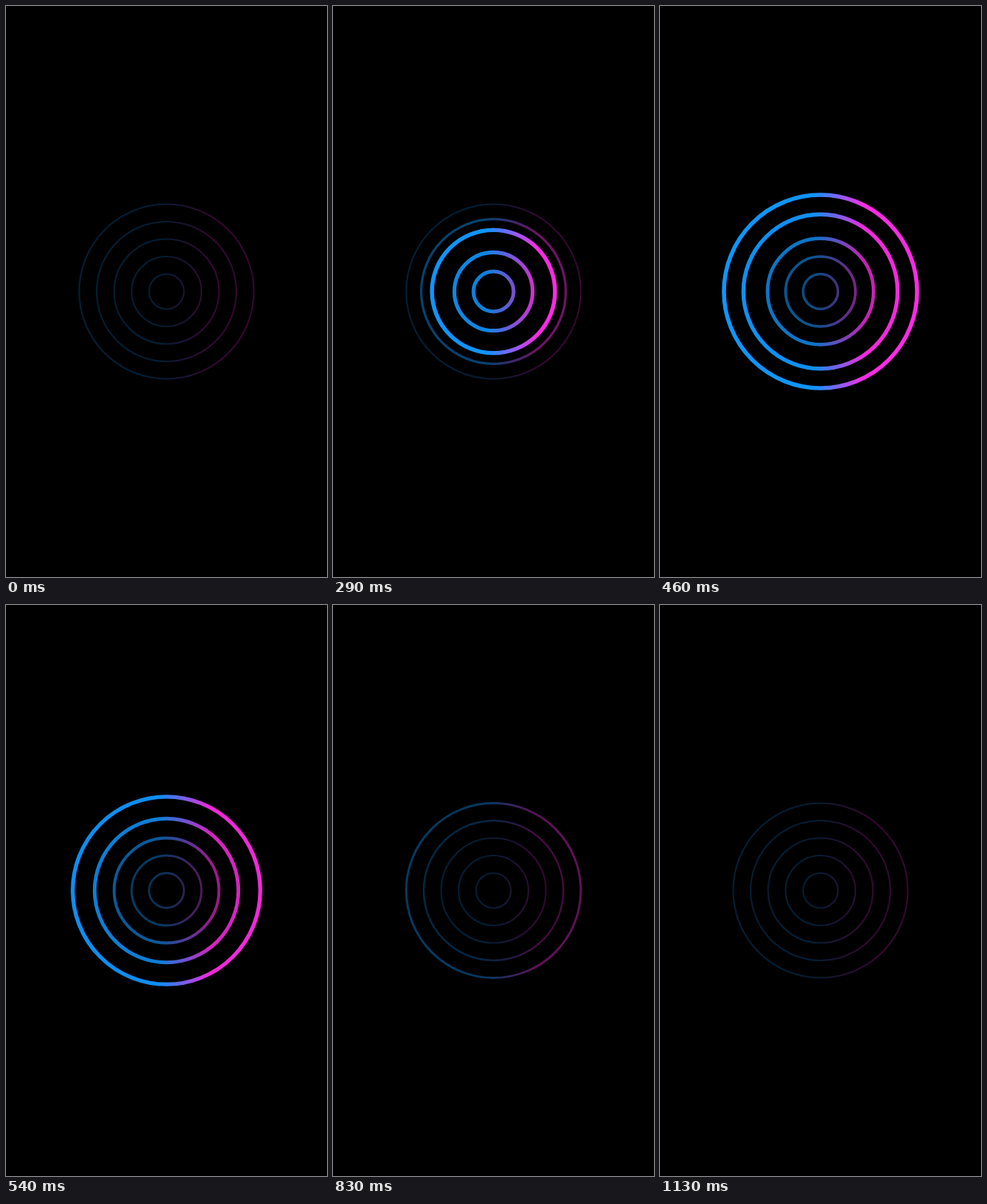
These frames come from a looping animation (432x768 px, 1.18 s). An HTML page with a canvas:

```html
<!DOCTYPE html>
<html lang="en">
<head>
<meta charset="utf-8">
<title>Pulse rings</title>
<style>
  html, body { margin: 0; width: 100%; height: 100%; overflow: hidden; background: #000; }
  canvas { display: block; width: 432px; height: 768px; }
</style>
</head>
<body>
<canvas id="stage" width="432" height="768"></canvas>
<script>
const ctx = document.getElementById('stage').getContext('2d');
const LOOP = 1180, FPS = 24, CX = 216, CY = 384, GAP = 23.5;
const REST = 0.2, PUSH = 12.5;

// When the wave reaches each ring, from the inside out (ms)
const STARTS = [0, 25, 125, 240, 310];

const tint = ctx.createLinearGradient(206, 0, 276, 0);
tint.addColorStop(0, 'rgb(14, 150, 255)');
tint.addColorStop(1, 'rgb(255, 42, 230)');

const ease = k => Math.sin(Math.min(1, Math.max(0, k)) * Math.PI / 2) ** 2;

// Eased rise from 0 to 1 at peak, then eased fall back to 0 at end
const pulse = (t, peak, end) =>
  t < peak ? ease(t / peak) : ease((end - t) / (end - peak));

function drawRing(i, t) {
  const local = t - STARTS[i];
  const push = PUSH * pulse(local, 150, 370);
  const glow = pulse(local, 140, 700);
  ctx.globalAlpha = REST + (1 - REST) * glow;
  ctx.lineWidth = 2.2 + 3.3 * glow;
  ctx.beginPath();
  ctx.arc(CX, CY, GAP * (i + 1) + push, 0, Math.PI * 2);
  ctx.stroke();
}

const begin = performance.now();

function draw() {
  const now = Math.max(0, performance.now() - begin) % LOOP;
  const t = Math.floor((now + 4) * FPS / 1000) * 1000 / FPS;
  ctx.globalAlpha = 1;
  ctx.fillStyle = '#000';
  ctx.fillRect(0, 0, 432, 768);
  ctx.strokeStyle = tint;
  STARTS.forEach((_, i) => drawRing(i, t));
  requestAnimationFrame(draw);
}
draw();
</script>
</body>
</html>
```
